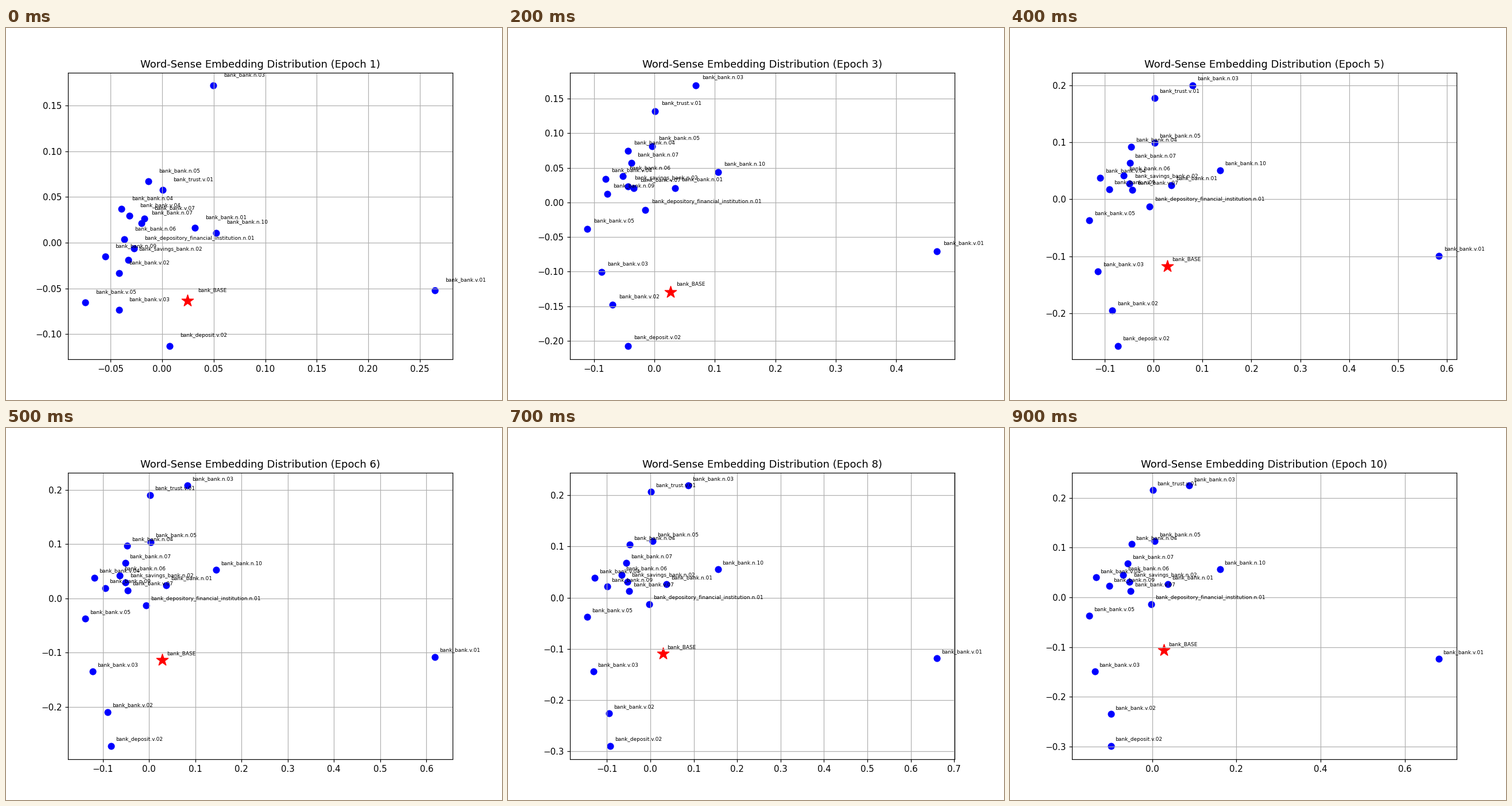
A matplotlib script that plays this animation: 864x648 px, repeating every 1000 ms.

```python
import matplotlib.pyplot as plt
import numpy as np
from matplotlib.animation import FuncAnimation

EPOCHS = 10
LEAP = 0.255   # share of the horizontal way covered by the second epoch
DECAY = 0.71   # share of the remaining way left after each later epoch
OFFSET = 0.01  # label offset in data units

# Horizontal start and end; vertical start, rebound and end.
SENSES = {
    "bank.n.01": ((.0317, .0375), (.0164, .0185, .0264)),
    "bank.n.03": ((.0497, .0886), (.1720, .1440, .2243)),
    "bank.n.04": ((-.0395, -.0484), (.0371, .0597, .1066)),
    "bank.n.05": ((-.0134, .0068), (.0673, .0670, .1135)),
    "bank.n.06": ((-.0365, -.0682), (.0035, .0346, .0449)),
    "bank.n.07": ((-.0203, -.0573), (.0211, .0520, .0685)),
    "bank.n.09": ((-.0554, -.1022), (-.0151, .0078, .0224)),
    "bank.n.10": ((.0526, .1609), (.0110, .0383, .0564)),
    "bank.v.01": ((.2646, .6812), (-.0525, -.0473, -.1230)),
    "bank.v.02": ((-.0420, -.0975), (-.0333, -.1093, -.2348)),
    "bank.v.03": ((-.0420, -.1357), (-.0736, -.0785, -.1489)),
    "bank.v.04": ((-.0315, -.1329), (.0296, .0318, .0397)),
    "bank.v.05": ((-.0744, -.1487), (-.0651, -.0385, -.0370)),
    "bank.v.07": ((-.0175, -.0511), (.0261, .0240, .0126)),
    "trust.v.01": ((.0006, .0020), (.0579, .0940, .2156)),
    "deposit.v.02": ((.0072, -.0975), (-.1132, -.1667, -.2989)),
    "savings_bank.n.02": ((-.0326, -.0545), (-.0186, .0193, .0316)),
    "depository_financial_institution.n.01": ((-.0273, -.0020), (-.0066, -.0102, -.0134)),
    "BASE": ((.0247, .0286), (-.0634, -.1400, -.1067)),
}


def position(sense, epoch):
    """Jump once after the first epoch, then settle geometrically."""
    (x_start, x_end), (y_start, y_rebound, y_end) = SENSES[sense]
    if epoch == 1:
        return x_start, y_start
    x_rebound = x_start + LEAP * (x_end - x_start)
    settled = (1 - DECAY ** (epoch - 2)) / (1 - DECAY ** (EPOCHS - 2))
    return (x_rebound + settled * (x_end - x_rebound),
            y_rebound + settled * (y_end - y_rebound))


plt.rcParams["font.family"] = "DejaVu Sans"
fig, ax = plt.subplots(figsize=(8, 6), dpi=108)


def draw(frame):
    epoch = frame + 1
    points = np.array([position(sense, epoch) for sense in SENSES])
    ax.clear()
    ax.scatter(*points[:-1].T, color="blue", s=50)
    ax.scatter(*points[-1], color="red", marker="*", s=200)
    for sense, (x, y) in zip(SENSES, points):
        ax.text(x + OFFSET, y + OFFSET, f"bank_{sense}", fontsize=6)
    ax.set_title(f"Word-Sense Embedding Distribution (Epoch {epoch})")
    ax.grid(True)


anim = FuncAnimation(fig, draw, frames=EPOCHS, interval=100, repeat=True)
plt.show()
```
